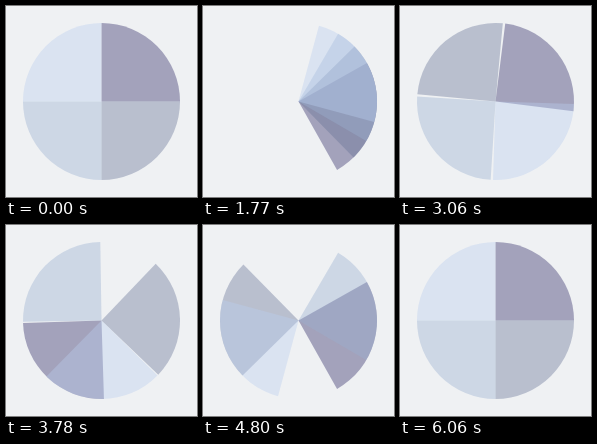
These frames come from a looping animation (191 by 191 pixels, 6.09 s). An HTML page:

```html
<!DOCTYPE html>
<html lang="en">
<head>
<meta charset="utf-8">
<title>Turning quarters</title>
<style>
  html, body { margin: 0; width: 100%; height: 100%; overflow: hidden; background: #eff1f3; }
  svg { display: block; width: 100vw; height: 100vh; }
  path { fill-opacity: .4; }
</style>
</head>
<body>
<svg viewBox="0 0 191 191"></svg>
<script>
const STEP = 30, STEPS = 203, CENTER = 95.5, RADIUS = 78.5;

// Bottom to top; each quarter makes `turns` full turns per loop.
const quarters = [
  { color: '#312b67', start: 0, turns: 4 },
  { color: '#687496', start: 90, turns: 3 },
  { color: '#9aaed0', start: 180, turns: 2 },
  { color: '#b8ceee', start: 270, turns: 1 }
];

const svg = document.querySelector('svg');
for (const q of quarters) {
  q.el = document.createElementNS('http://www.w3.org/2000/svg', 'path');
  q.el.setAttribute('d', `M0 0V${-RADIUS}A${RADIUS} ${RADIUS} 0 0 1 ${RADIUS} 0Z`);
  q.el.setAttribute('fill', q.color);
  svg.append(q.el);
}

function draw(ms) {
  const step = Math.floor(ms / STEP) % STEPS;
  const turn = 360 * step / (STEPS - 1);
  for (const q of quarters) {
    const angle = (q.start + q.turns * turn) % 360;
    q.el.setAttribute('transform', `translate(${CENTER} ${CENTER}) rotate(${angle})`);
  }
}

const began = performance.now();
function tick() {
  draw(performance.now() - began);
  requestAnimationFrame(tick);
}
tick();
</script>
</body>
</html>
```
